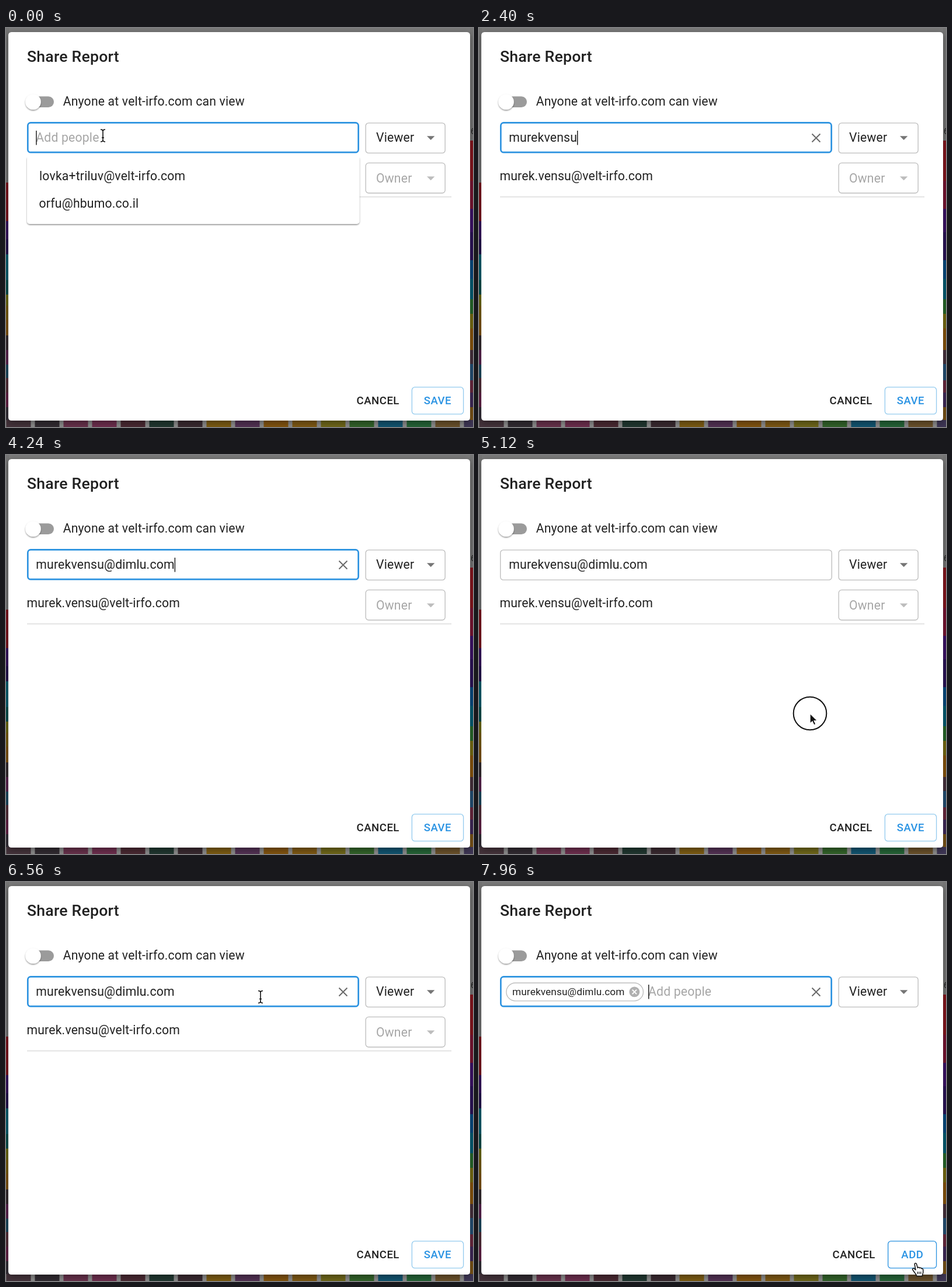
An HTML page for the animation above (8000 ms loop, 800x684 px).

```html
<!DOCTYPE html>
<html lang="en">
<head>
<meta charset="utf-8">
<title>Share dialog</title>
<style>
html, body { margin: 0; width: 100%; height: 100%; overflow: hidden; background: #757575; }
svg { display: block; width: 100vw; height: 100vh; }
text { font: 400 21.2px Roboto, sans-serif; letter-spacing: .18px; fill: #212121; white-space: pre; }
.title { font-size: 26.67px; font-weight: 500; letter-spacing: .0075em; }
.btn { font-size: 18.6px; font-weight: 500; letter-spacing: .48px; }
.chip { font-size: 17.2px; letter-spacing: .14px; }
.blue { fill: #2a93e3; }
.hint { fill: #a6a6a6; }
.box { fill: #fff; stroke: #bdbdbd; stroke-width: 1.33; }
</style>
</head>
<body>
<svg viewBox="0 0 800 684">
  <defs>
    <filter id="lift" x="-5%" y="-10%" width="110%" height="125%">
      <feDropShadow dx="0" dy="1.5" stdDeviation="1.3" flood-opacity=".45"/>
    </filter>
    <filter id="shade" x="-5%" y="-5%" width="110%" height="110%">
      <feDropShadow dx="0" dy="3" stdDeviation="6" flood-opacity=".4"/>
    </filter>
  </defs>
  <rect width="800" height="684" fill="#7a7a7a"/>
  <g id="chart"></g>
  <text x="796" y="182" style="font-size:15px">6</text>
  <rect x="4" y="7" width="791" height="666" rx="5.3" fill="#fff" filter="url(#shade)"/>

  <text class="title" x="36" y="58">Share Report</text>
  <rect x="37" y="117.3" width="45" height="18.7" rx="9.35" fill="#9b9b9b"/>
  <circle cx="46.5" cy="126.7" r="13.3" fill="#fff" filter="url(#lift)"/>
  <text x="97.7" y="133">Anyone at velt-irfo.com can view</text>

  <g id="owner">
    <text x="35.5" y="261">murek.vensu@velt-irfo.com</text>
    <path d="M36 289.5H763" stroke="#dcdcdc" stroke-width="1.33"/>
    <rect class="box" x="616.2" y="231.4" width="136" height="51.6" rx="5"/>
    <text class="hint" x="634" y="265">Owner</text>
    <path d="M721 254.5h13.4l-6.7 6.7z" fill="#bdbdbd"/>
  </g>
  <rect class="box" x="616.2" y="162.8" width="136" height="51.6" rx="5"/>
  <text x="634" y="195">Viewer</text>
  <path d="M721 185.3h13.4l-6.7 6.7z" fill="#757575"/>

  <g id="menu">
    <rect x="36" y="219" width="569.5" height="117" rx="5" fill="#fff" filter="url(#lift)"/>
    <rect x="34" y="212" width="573" height="10" fill="#fff"/>
    <text x="57" y="261">lovka+triluv@velt-irfo.com</text>
    <text x="56.5" y="308">orfu@hbumo.co.il</text>
  </g>

  <rect id="field" rx="5" fill="#fff"/>
  <g id="chip">
    <rect class="box" x="46.8" y="173" width="234.6" height="30.8" rx="15.4"/>
    <text class="chip" x="57" y="194">murekvensu@dimlu.com</text>
    <circle cx="266.3" cy="188.4" r="8.9" fill="#b0b0b0"/>
    <path d="M262.6 184.7l7.4 7.4m0-7.4l-7.4 7.4" stroke="#fff" stroke-width="1.9"/>
  </g>
  <text id="hint" class="hint" y="195">Add people</text>
  <text id="typed" x="51.3" y="195"></text>
  <rect id="caret" y="176" width="1.4" height="24.5" fill="#111"/>
  <path id="clear" d="M570.5 181.5l14 14m0-14l-14 14" stroke="#6b6b6b" stroke-width="2"/>

  <text id="cancel" class="btn" y="645">CANCEL</text>
  <rect id="saveBox" y="615.7" height="46.2" rx="5" fill="#fff" stroke-width="1.33"/>
  <text id="save" class="btn blue" y="645"></text>

  <circle id="ring" r="28.3" fill="none" stroke="#111" stroke-width="2"/>
  <g id="mouse">
    <path id="arrow" d="M0 0V17.5L4 13.8L6.8 20L10 18.6L7.3 12.6H12.6Z" fill="#111" stroke="#fff" stroke-width="1.4"/>
    <g id="beam" fill="none">
      <path id="bar" d="M-4-10.5Q0-10.5 0-7.5V7.5Q0 10.5-4 10.5M4-10.5Q0-10.5 0-7.5M0 7.5Q0 10.5 4 10.5M-2 3.5H2" stroke="#fff" stroke-width="3.4"/>
      <path d="M-4-10.5Q0-10.5 0-7.5V7.5Q0 10.5-4 10.5M4-10.5Q0-10.5 0-7.5M0 7.5Q0 10.5 4 10.5M-2 3.5H2" stroke="#111" stroke-width="1.6"/>
    </g>
    <g id="hand" stroke="#111" stroke-width="1.5" stroke-linejoin="round">
      <path d="M-3 9L-4.8-.5C-5.2-2.8-2-3.3-1.4-1L.4 5.5C1.5 4 3.3 4.3 3.8 5.8C5 4.8 6.6 5.4 7 6.8C8.6 6.2 9.8 7.3 9.8 9V13C9.8 15 8.5 16.5 8.3 19.5H-1.2C-1.6 17-4.5 14-6.2 11.5L-8.4 8.4C-9 6.8-7 5.6-5.6 6.8Z" fill="#fff"/>
      <path d="M.3 12V16M3 12V16M5.8 12V16" stroke-width="1.2"/>
    </g>
  </g>
</svg>
<script>
const LOOP = 8000;
const MAIL = 'murekvensu@dimlu.com';
const BLUR = 5080, REFOCUS = 5960, CHIP = 6900;
const BLUE = '#2b92e0';
const $ = id => document.getElementById(id);
const set = (id, attrs) => {
  for (const k in attrs) $(id).setAttribute(k, attrs[k]);
};
const show = (id, on) => set(id, { visibility: on ? 'visible' : 'hidden' });

// Dimmed chart that peeks out around the dialog
const rect = (x, y, w, h, fill) => `<rect x="${x}" y="${y}" width="${w}" height="${h}" fill="${fill}"/>`;
const column = (x, w, bands) => bands.map(([y, c], i) =>
  rect(x, y, w, (bands[i + 1] || [684])[0] - y, c)).join('');
const left = [[0, '#757575'], [265, '#7d1620'], [331, '#37105f'], [362, '#251150'], [388, '#005f70'],
  [432, '#00504e'], [457, '#6d6a10'], [476, '#795e0b'], [500, '#805410'], [527, '#352c30'],
  [552, '#5b2450'], [577, '#1d4a60'], [600, '#54303a'], [625, '#642347'], [650, '#343038']];
const right = [[0, '#757575'], [193, '#85161e'], [262, '#771432'], [310, '#3c1268'], [350, '#2b1358'],
  [398, '#064a80'], [430, '#005c72'], [465, '#26682a'], [490, '#766b12'], [515, '#87540c'],
  [552, '#46303c'], [576, '#234f73'], [604, '#69273e'], [625, '#3f2858'], [650, '#785216']];
const feet = ['#43323a', '#302a30', '#66304a', '#6b2d4c', '#482831', '#20362f', '#38292f', '#7a5a12',
  '#513052', '#80520f', '#7c5713', '#6d6519', '#316129', '#11536f', '#246236', '#69502a', '#3d3554'];
$('chart').innerHTML = column(0, 5, left) + column(795, 5, right) +
  rect(0, 672, 800, 12, '#8a8a8a') +
  feet.map((c, i) => rect(i * 49 + .5, 672, 42, 12, c)).join('');

// Moment at which each character is typed
const keys = [...MAIL].map((_, i) =>
  i < 2 ? 900 + i * 100 : i < 10 ? 1000 + (i - 1) * 162 : 2760 + (i - 10) * 147);

const moves = [[0, 166, 184.5], [4400, 166, 184.5], [4960, 567, 443], [5300, 567, 443],
  [5860, 436, 197], [7050, 436, 197], [7800, 751, 656], [LOOP, 751, 656]];
const pointer = t => {
  const i = moves.findIndex(m => t < m[0]);
  const [t0, x0, y0] = moves[i - 1], [t1, x1, y1] = moves[i];
  const p = (t - t0) / (t1 - t0), e = p * p * (3 - 2 * p);
  return [x0 + (x1 - x0) * e, y0 + (y1 - y0) * e];
};
const inside = (x, y, l, t, r, b) => x >= l && x <= r && y >= t && y <= b;

function draw(t) {
  const done = t >= CHIP;
  const focus = t < BLUR || t >= REFOCUS;
  const count = done ? 0 : keys.filter(k => k <= t).length;
  const visible = t < 900 || (t >= 4400 && t < CHIP) || t >= 7050;
  const [x, y] = pointer(t);
  const overField = visible && inside(x, y, 36, 162, 605, 215);
  const overSave = visible && inside(x, y, 700, 615, 784, 662);

  $('typed').textContent = MAIL.slice(0, count);
  const start = done ? 290 : 51.3;
  show('menu', count < 2 && !done);
  show('owner', !done);
  show('chip', done);
  show('hint', !count);
  set('hint', { x: start });
  show('clear', (focus || overField) && (count || done));
  set('field', focus
    ? { x: 37.3, y: 162.4, width: 566.4, height: 50.8, stroke: BLUE, 'stroke-width': 2.67 }
    : { x: 36.7, y: 162.8, width: 567.6, height: 51.4, stroke: overField ? '#212121' : '#bdbdbd', 'stroke-width': 1.33 });

  const typedAt = count ? keys[count - 1] : 0;
  const since = done ? CHIP : t >= REFOCUS ? REFOCUS : typedAt;
  show('caret', focus && (t - since) % 1000 < 500);
  set('caret', { x: start + (count ? $('typed').getComputedTextLength() : 0) });

  set('cancel', { x: done ? 605.6 : 600.6 });
  $('save').textContent = done ? 'ADD' : 'SAVE';
  set('save', { x: done ? 723.3 : 715.7 });
  set('saveBox', {
    x: done ? 700.7 : 695.4, width: done ? 82.9 : 88.2,
    stroke: overSave ? BLUE : '#94cbee'
  });

  show('ring', [BLUR, REFOCUS].some(c => t >= c && t < c + 240));
  set('ring', { cx: x, cy: y });
  set('mouse', { transform: `translate(${x} ${y})` });
  show('beam', overField);
  show('hand', overSave);
  show('arrow', visible && !overField && !overSave);
}

const begin = performance.now();
function tick() {
  draw((performance.now() - begin) % LOOP);
  requestAnimationFrame(tick);
}
tick();
</script>
</body>
</html>
```
